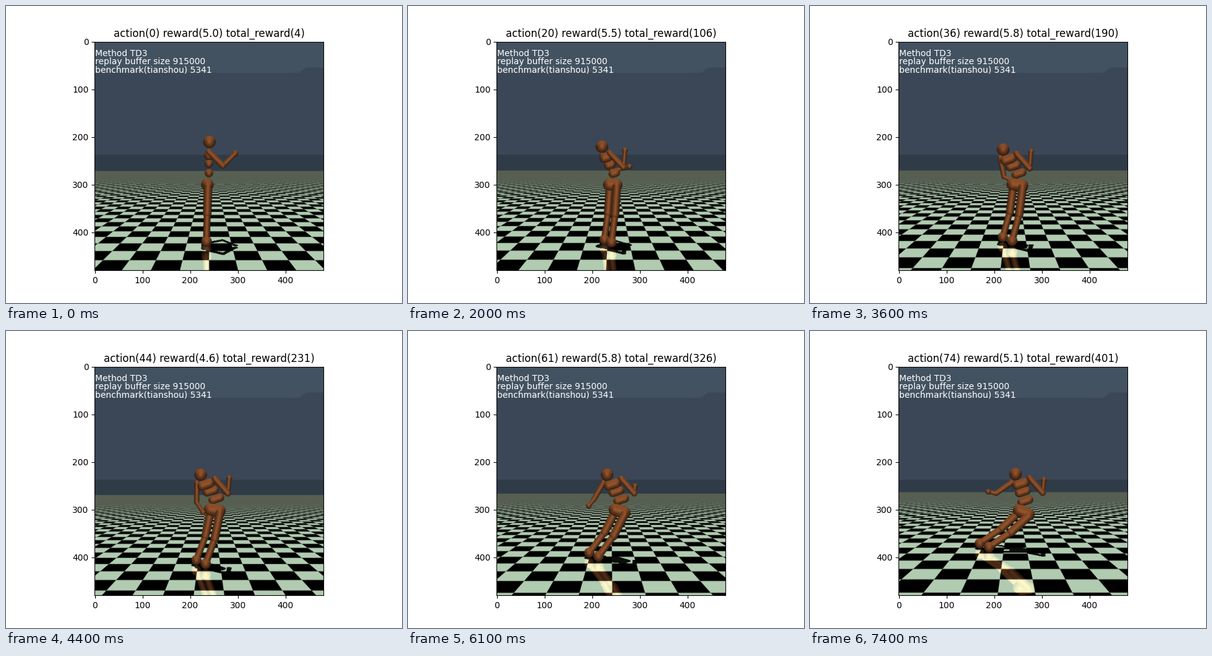
A matplotlib script for the animation above (7500 ms loop, 640 px wide and 480 px high).

```python
import numpy as np
import matplotlib.pyplot as plt
from matplotlib.animation import FuncAnimation

FRAMES = 75
SIZE = 480
MID = SIZE / 2
FOCAL = MID / np.tan(np.radians(22.5))
CELL = 1 / 3
FAR = 24

TILE = np.array([178, 204, 178.])
HAZE = np.array([86, 95, 81.])
COPPER = np.array([172, 98, 52.])


def step(v):
    v = np.clip(v, 0, 1)
    return v * v * (3 - 2 * v)


def vec(degrees, length):
    """Stage vector; 0 degrees hangs straight down, 90 points right."""
    a = np.radians(degrees)
    return length * np.hstack([np.sin(a), np.cos(a)])


def place(stage, depth):
    """Stage pixels to camera picture coordinates plus depth in metres."""
    xy = (stage - (143.2, 57.6)) / 0.77 - 0.5
    return np.column_stack([xy, np.full(FRAMES, depth)])


# score: 5 per step for staying up, plus speed, minus effort
reward = np.interp(np.arange(FRAMES),
                   [0, 5, 10, 19, 28, 36, 44, 49, 54, 61, 68, 71, 74],
                   [4.97, 4.8, 4.9, 5.52, 4.9, 5.77, 4.6, 5.42, 5.9, 5.81, 5.4, 6.8, 5.1])
total = np.cumsum(reward)
travel = np.cumsum(reward - 5 + .17) * .015 / 1.25

# pose over the run: the body twists and leans, then falls forward
u = np.linspace(0, 1, FRAMES)[:, None]
fall = u ** 3
twist = step(u / .4)
turn = step(u / .6)
height = (1.31 - .31 * fall)[:, 0]

hips = (326.5, 291) + u * (20, 0) + fall * (0, 4.5)
feet = (324, 380.5) - fall * (42, 34)
waist = hips + (1.5, -20.5)
chest = waist - vec(37 * twist - 22 * u ** 6, 28.5)
belly = .53 * chest + .47 * waist
head = chest - vec(30 * twist - 2, 22 - 4 * twist)
hip_side = twist * (7.5, 0) + u ** 2 * (0, 3.5)
foot_side = twist * (7.5, 3)
rib_side = turn * (6, -2)
shoulder_side = turn * (14.5, -3.5)

parts = [(place(head, 4), place(head, 4), .09)]


def add_barrel(centre, side, radius):
    parts.append((place(centre - side, 4.07), place(centre + side, 3.93), radius))


def add_limb(joints, depths, radii):
    a, b, c = (place(j, d) for j, d in zip(joints, depths))
    parts.extend(zip((a, b, c), (b, c, c), radii))


add_barrel(chest, rib_side, .07)
add_barrel(belly, rib_side, .06)
add_barrel(waist, rib_side, .06)
add_barrel(hips - (1, 2), hip_side, .09)

upper_arms = {-1: vec(45 - 100 * u ** 1.5, 31), 1: vec(45 - 4 * turn, 32)}
dip = np.exp(-((u - .83) / .18) ** 2)
forearms = {-1: vec(134 - 235 * u ** 1.6, 29 - 16 * step((u - .4) / .35)),
            1: vec(135 + 40 * step(u / .15), 28 - 16 * dip)}
for side in (-1, 1):
    hip = hips + side * hip_side
    foot = feet + side * foot_side
    knee = (hip + foot) / 2 + turn * (3, 1.5)
    add_limb((hip, knee, foot), 4 - side * np.array([.1, .09, .09]),
             (.06, .049, .075))
    shoulder = chest + (0, -6) + side * shoulder_side
    elbow = shoulder + upper_arms[side]
    add_limb((shoulder, elbow, elbow + forearms[side]),
             4 - side * np.array([.17, .3, .05]), (.04, .031, .04))


def nearest(x, y, a, b):
    """Offset from the closest point of segment ab, and where it lies."""
    d = b - a
    t = np.clip(((x - a[0]) * d[0] + (y - a[1]) * d[1]) / max(d @ d, 1e-9), 0, 1)
    return x - a[0] - t * d[0], y - a[1] - t * d[1], t


def draw_capsule(img, zbuf, a, b, radius, up=1):
    r = radius * FOCAL / (a[2] + b[2]) * 2
    lo = np.clip(np.minimum(a, b)[:2] - r - 2, 0, SIZE).astype(int)
    hi = np.clip(np.maximum(a, b)[:2] + r + 3, 0, SIZE).astype(int)
    if (hi <= lo).any():
        return
    box = np.s_[lo[1]:hi[1], lo[0]:hi[0]]
    y, x = np.mgrid[box]
    dx, dy, t = nearest(x, y, a[:2], b[:2])
    dist = np.hypot(dx, dy)
    nz = np.sqrt(np.clip(1 - (dist / r) ** 2, 0, 1))
    z = a[2] + t * (b[2] - a[2]) - radius * nz
    cover = np.clip(r - dist + .5, 0, 1) * (z < zbuf[box])
    light = .14 + .45 * nz + .5 * np.clip(-up * dy / r, 0, 1) + .25 * nz ** 16
    img[box] += cover[..., None] * (light[..., None] * COPPER - img[box])
    zbuf[box] = np.where(cover > .5, z, zbuf[box])


def square_wave(v, w):
    """Square wave of half period 1, averaged over width w."""
    def tri(s):
        return 1 - np.abs(s % 2 - 1)
    return (tri(v + w / 2) - tri(v - w / 2)) / w


def make_sky():
    y, x = np.mgrid[:SIZE, :SIZE]
    sky = np.empty((SIZE, SIZE, 3))
    sky[:] = 59, 71, 86
    sky[y < 65.5 - 11 * step((x - 426) / 20)] = 67, 82, 97
    sky[(y == 63) & (x > 404) & (x < 430)] = 74, 78, 82
    sky[y >= MID - 2] = 48, 59, 72
    return sky


SKY = make_sky()


def draw_floor(img, k):
    h = height[k]
    top = int(round(MID + FOCAL * h / FAR))
    rows = np.arange(top, SIZE)[:, None]
    z = FOCAL * h / (rows - MID)
    x = (np.arange(SIZE)[None] - MID) * z / FOCAL
    across = square_wave((x + travel[k]) / CELL, z / FOCAL / CELL)
    along = square_wave((z - 3.474) / CELL, 1.6 * z * z / (FOCAL * h) / CELL)
    haze = np.clip((z - 8) / 9, 0, 1)[..., None]
    lit = .5 + .5 * (across * along)[..., None] * (1 - haze)
    floor = lit * ((1 - haze) * TILE + haze * 2 * HAZE)

    # light falls straight down
    near = (z[:, 0] < 4.7) & (z[:, 0] > 3.2)
    gx, gz = x[near], np.broadcast_to(z, x.shape)[near]
    shadow = np.zeros(gx.shape, bool)
    for a, b, r in parts:
        p, q = (np.array([(e[0] - MID) * e[2] / FOCAL, e[2]]) for e in (a[k], b[k]))
        dx, dz, _ = nearest(gx, gz, p, q)
        shadow |= dx * dx + dz * dz < r * r
    floor[near] *= np.where(shadow, .07, 1)[..., None]

    # mirror image in the polished tiles
    mirror = np.zeros_like(img)
    zbuf = np.full((SIZE, SIZE), 99.)
    for a, b, r in parts:
        ends = [np.array([e[0], 2 * (MID + FOCAL * h / e[2]) - e[1], e[2]])
                for e in (a[k], b[k])]
        draw_capsule(mirror, zbuf, *ends, r, up=-1)
    img[top:] = floor + .55 * mirror[top:]


def render(k):
    img = SKY.copy()
    draw_floor(img, k)
    zbuf = np.full((SIZE, SIZE), 99.)
    for a, b, r in parts:
        draw_capsule(img, zbuf, a[k], b[k], r)
    return np.clip(img, 0, 255).astype(np.uint8)


fig, ax = plt.subplots(figsize=(6.4, 4.8), dpi=100)
picture = ax.imshow(render(0))
for i, line in enumerate(("Method TD3", "replay buffer size 915000",
                          "benchmark(tianshou) 5341")):
    ax.text(0, 30 + 17 * i, line, color="white")


def update(k):
    picture.set_data(render(k))
    ax.set_title(f"action({k}) reward({reward[k]:.1f}) total_reward({int(total[k])})")
    return [picture]


anim = FuncAnimation(fig, update, frames=FRAMES, interval=100, repeat=True,
                     cache_frame_data=False)
plt.show()
```
